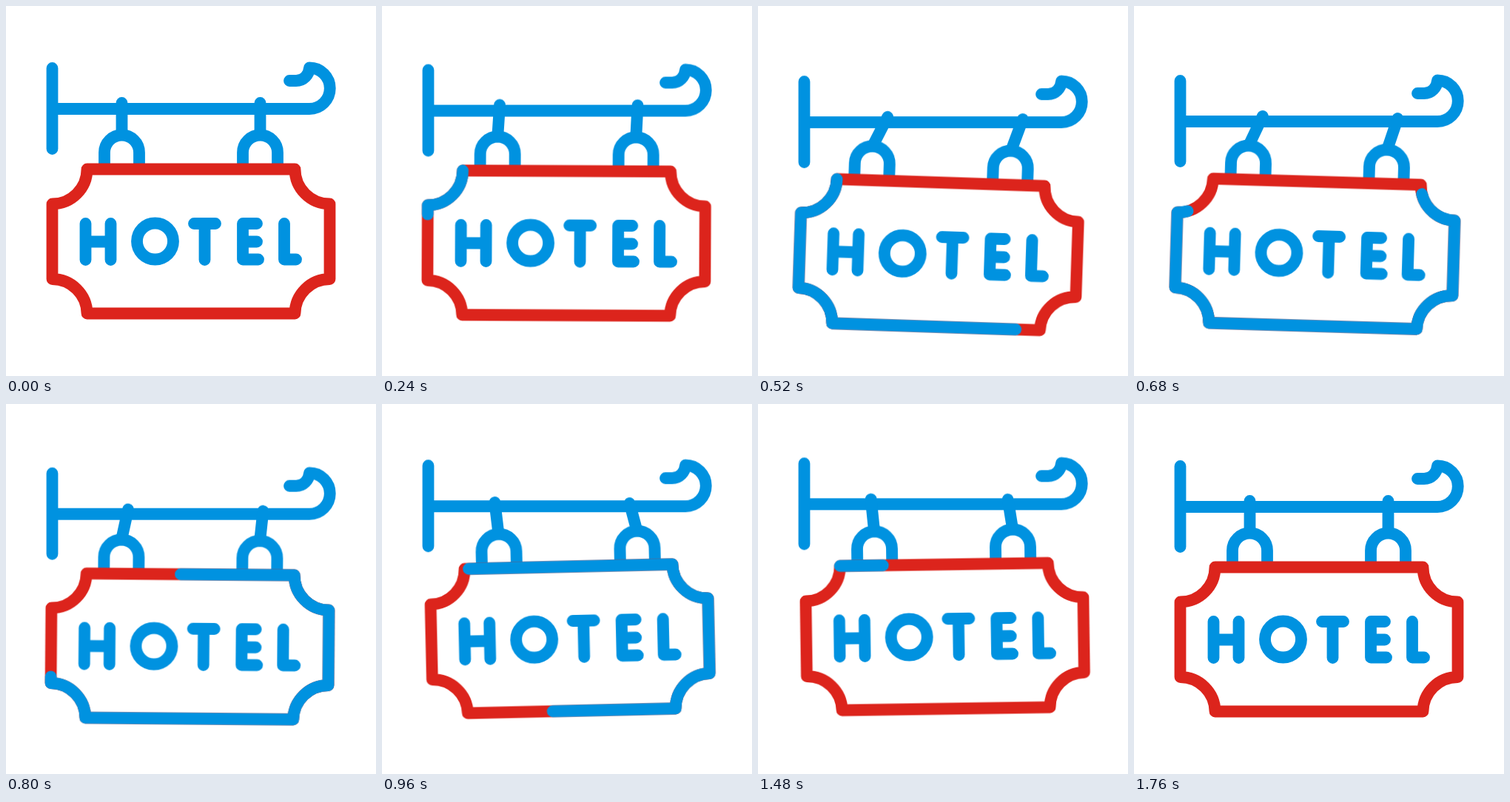
An HTML page that plays this animation: 500 by 500 pixels, repeating every 2000 ms.

```html
<!DOCTYPE html>
<html lang="en">
<head>
<meta charset="utf-8">
<title>Swinging hotel sign</title>
<style>
@property --head { syntax: "<length>"; inherits: false; initial-value: 0px; }
@property --tail { syntax: "<length>"; inherits: false; initial-value: 0px; }

:root { --blue: #0092e0; --red: #dc241c; }
html, body { margin: 0; width: 100%; height: 100%; overflow: hidden; background: #fff; }
svg { display: block; width: 100vw; height: 100vh; }

path, circle {
  fill: none;
  stroke: var(--blue);
  stroke-width: 15.8;
  stroke-linecap: round;
  stroke-linejoin: round;
}
.frame { stroke: var(--red); }

.bob { animation: bob 2s infinite; }
.swing { transform-origin: 250px 131px; animation: swing 2s infinite; }
.link-l { animation: link-l 2s infinite; }
.link-r { animation: link-r 2s infinite; }

/* Blue stroke runs around the frame; its two ends are eased separately. */
.runner {
  stroke-dasharray: calc(var(--head) - var(--tail)) 2000px;
  stroke-dashoffset: calc(0px - var(--tail));
  animation: head 2s infinite, tail 2s infinite, shown 2s step-end infinite;
}

@keyframes bob {
  0%, 5% { transform: translateY(0); animation-timing-function: cubic-bezier(.5, 0, .6, 1); }
  29.5% { transform: translateY(19px); animation-timing-function: cubic-bezier(.3, 0, .48, 1); }
  61% { transform: translateY(-7.1px); animation-timing-function: cubic-bezier(.4, 0, .6, 1); }
  87.5%, 100% { transform: translateY(0); }
}
@keyframes swing {
  0%, 5% { transform: rotate(0deg); animation-timing-function: cubic-bezier(.5, 0, .6, 1); }
  29.5% { transform: rotate(2deg); animation-timing-function: cubic-bezier(.35, 0, .5, 1); }
  57.5% { transform: rotate(-2deg); animation-timing-function: cubic-bezier(.4, 0, .6, 1); }
  87.5%, 100% { transform: rotate(0deg); }
}
@keyframes link-l {
  0%, 5% { d: path("M156.5 131L156.5 174"); animation-timing-function: cubic-bezier(.5, 0, .6, 1); }
  29.5% { d: path("M176 131.8L155 170.7"); animation-timing-function: cubic-bezier(.35, 0, .5, 1); }
  57.5% { d: path("M147.3 134.2L158 177.3"); animation-timing-function: cubic-bezier(.4, 0, .6, 1); }
  87.5%, 100% { d: path("M156.5 131L156.5 174"); }
}
@keyframes link-r {
  0%, 5% { d: path("M343.5 131L343.5 174"); animation-timing-function: cubic-bezier(.5, 0, .6, 1); }
  29.5% { d: path("M358.5 135L342 177.3"); animation-timing-function: cubic-bezier(.35, 0, .5, 1); }
  57.5% { d: path("M329.5 135L345 170.7"); animation-timing-function: cubic-bezier(.4, 0, .6, 1); }
  87.5%, 100% { d: path("M343.5 131L343.5 174"); }
}
@keyframes head {
  0%, 4% { --head: 0px; animation-timing-function: cubic-bezier(.333, 0, .667, 1); }
  50%, 100% { --head: 1000px; }
}
@keyframes tail {
  0%, 26% { --tail: 0px; animation-timing-function: cubic-bezier(.333, 0, .667, 1); }
  82%, 100% { --tail: 1000px; }
}
@keyframes shown {
  0% { visibility: hidden; }
  4.1% { visibility: visible; }
  82%, 100% { visibility: hidden; }
}
</style>
</head>
<body>
<svg viewBox="0 0 500 500" role="img" aria-label="HOTEL">
  <g class="bob">
    <path d="M62.5 84V193M62.5 139H410A27.75 27.75 0 0 0 410 83.5C409.5 93 402 101 392 101H383"/>
    <path class="link-l" d="M156.5 131L156.5 174"/>
    <path class="link-r" d="M343.5 131L343.5 174"/>
    <g class="swing">
      <path d="M133 216V198A23.5 23.5 0 0 1 180 198V216M320 216V198A23.5 23.5 0 0 1 367 198V216"/>
      <path class="frame" d="M109.5 220.5A47 47 0 0 1 62.5 267.5V369A47 47 0 0 1 109.5 415.5H390.5A47 47 0 0 1 437.5 369V267.5A47 47 0 0 1 390.5 220.5Z"/>
      <path class="runner" pathLength="1000" d="M109.5 220.5A47 47 0 0 1 62.5 267.5V369A47 47 0 0 1 109.5 415.5H390.5A47 47 0 0 1 437.5 369V267.5A47 47 0 0 1 390.5 220.5H109.5"/>
      <path d="M107.5 294V343M141.5 294V343M107.5 318.5H141.5"/>
      <circle cx="201.5" cy="318" r="24.5"/>
      <path d="M254 294H283M268.5 294V343"/>
      <path d="M339 294H320V342.5H341M320 318.5H339"/>
      <path d="M376 294V342.5H392"/>
    </g>
  </g>
</svg>
</body>
</html>
```
